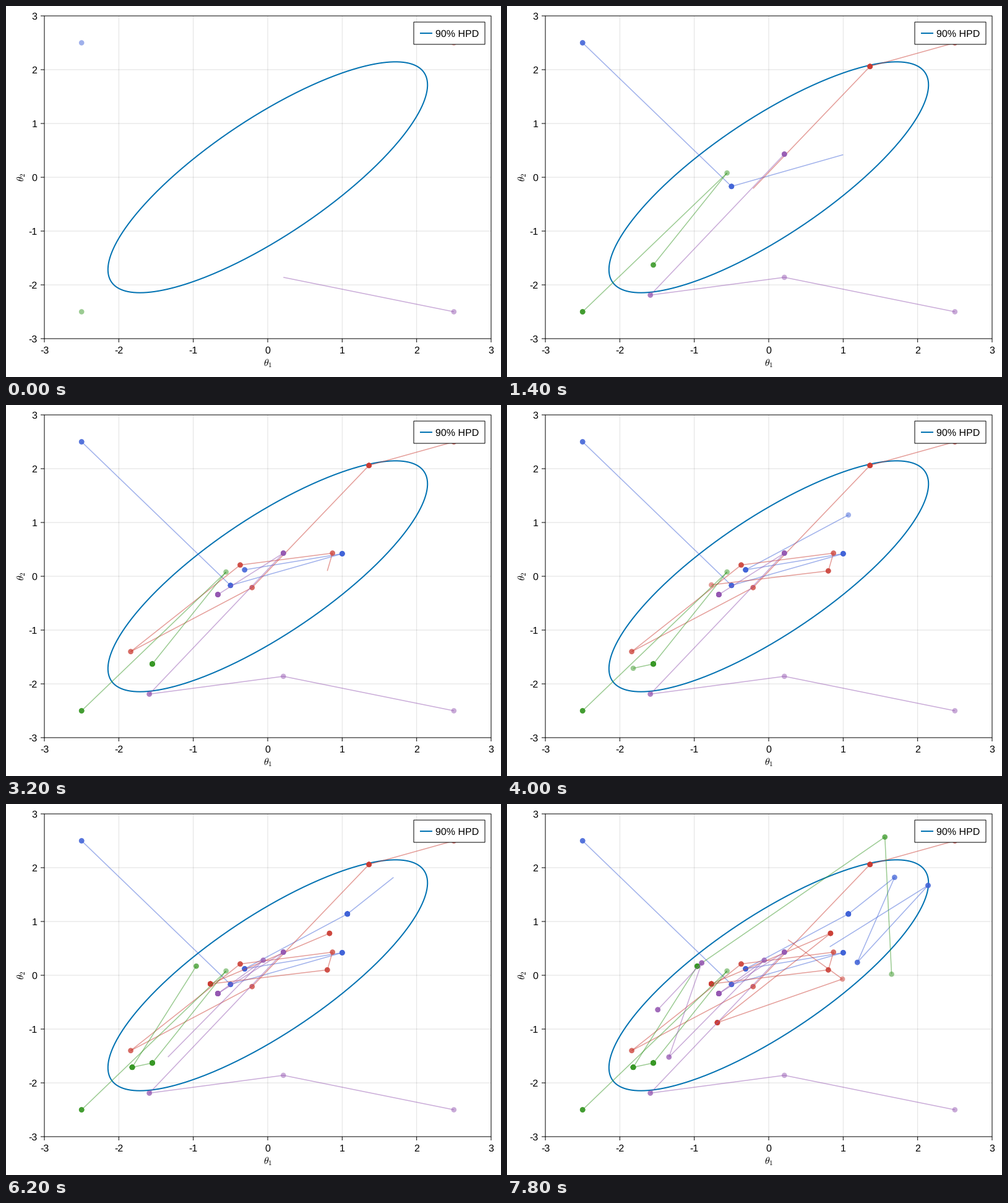
Recreate the animation shown at these times as a matplotlib script. Size 800 by 600 pixels, loop 8 s.

```python
import numpy as np
import matplotlib.pyplot as plt
from matplotlib.animation import FuncAnimation
from matplotlib.patches import Circle, Rectangle

W, H, DPI = 800, 600, 100
PT = 72 / DPI                      # points per pixel
LEFT, RIGHT, TOP, BOTTOM = 62, 784, 16, 538
FRAMES, STEP_MS = 40, 200
CORNER = 2.5

plt.rcParams["font.family"] = "Liberation Sans"
plt.rcParams["mathtext.fontset"] = "cm"
plt.rcParams["text.hinting"] = "no_hinting"

fig = plt.figure(figsize=(W / DPI, H / DPI), dpi=DPI, facecolor="white")
ax = fig.add_axes([0, 0, 1, 1])
ax.set_xlim(0, W)
ax.set_ylim(H, 0)
ax.axis("off")
parts = []                         # (first frame, artist)


def px(x):
    return LEFT + (x + 3) * (RIGHT - LEFT) / 6


def py(y):
    return BOTTOM - (y + 3) * (BOTTOM - TOP) / 6


def line(xs, ys, color="black", width=1.0, z=1, alpha=1.0):
    art, = ax.plot(xs, ys, color=color, lw=width * PT, zorder=z, alpha=alpha,
                   solid_capstyle="butt", snap=False)
    return art


def frame_box(x0, y0, x1, y1, fill, z):
    ax.add_patch(Rectangle((x0, y0), x1 - x0, y1 - y0, facecolor=fill,
                           edgecolor="black", lw=PT, zorder=z, snap=False))


def label(x, y, text, ha="center", va="baseline", **kw):
    ax.text(x, y, text, fontsize=16 * PT, ha=ha, va=va, zorder=20, **kw)


def draw_axes():
    for v in range(-3, 4):
        x, y = px(v), py(v)
        if abs(v) < 3:
            line([x, x], [TOP, BOTTOM], alpha=0.12)
            line([LEFT, RIGHT], [y, y], alpha=0.12)
        line([x, x], [BOTTOM, BOTTOM + 6])
        line([LEFT - 6, LEFT], [y, y])
        label(x, 562.3, str(v))
        label(50.5, y + 5.7, str(v), ha="right")
    frame_box(LEFT, TOP, RIGHT, BOTTOM, "none", 15)
    label(423.5, 577.5, r"$\theta_1$", va="center")
    label(24.5, 277, r"$\theta_2$", va="center", rotation=90)


def draw_region():
    """Smallest region holding 90% of a normal with correlation 0.8."""
    rho, radius = 0.8, np.sqrt(-2 * np.log(0.1))
    t = np.linspace(0, 2 * np.pi, 361)
    x = radius * np.cos(t)
    y = radius * (rho * np.cos(t) + np.sqrt(1 - rho**2) * np.sin(t))
    line(px(x), py(y), "#0072B2", 2, z=2)


def draw_legend():
    frame_box(659, 26, 774, 62, "white", 18)
    line([669, 689], [44, 44], "#0072B2", 2, z=19)
    label(694, 49.8, "90% HPD", ha="left")


def walk(start, *bursts):
    """Position at every step; a burst spreads its jumps evenly in time."""
    path = np.tile(np.array(start, float), (FRAMES + 1, 1))
    for first, last, *stops in bursts:
        steps = np.linspace(first, last, len(stops)).astype(int)
        for step, stop in zip(steps, stops):
            path[step:] = stop
    return path


def add_chain(color, z, corner, *bursts):
    """Every step stacks a half-clear dot; links run one step ahead."""
    path = walk((CORNER * corner[0], CORNER * corner[1]), *bursts)
    xs, ys = px(path[:, 0]), py(path[:, 1])
    for k in range(FRAMES):
        if (path[k] != path[k + 1]).any():
            link = line(xs[k:k + 2], ys[k:k + 2], color, 1.5, z, 0.5)
            parts.append((k, link))
        dot = Circle((xs[k], ys[k]), 4.3, facecolor=color, edgecolor="none",
                     alpha=0.5, zorder=z + 0.5)
        parts.append((k, ax.add_patch(dot)))


draw_axes()
draw_region()
draw_legend()

# Bursts: first step, last step, then the points jumped to.
add_chain("#4063D8", 3, (-1, 1),
          (3, 20, (-.5, -.17), (1, .42), (-.31, .12), (1.07, 1.14)),
          (32, 40, (1.69, 1.82), (1.19, .24), (2.14, 1.67), (.82, .53)))
add_chain("#CB3C33", 4, (1, 1),
          (2, 2, (1.36, 2.06)),
          (8, 20, (-.21, -.21), (-1.84, -1.4), (-.37, .21), (.87, .43),
           (.8, .1), (-.77, -.16)),
          (28, 33, (.83, .78), (-.69, -.88)),
          (39, 40, (.99, -.07), (.26, .66)))
add_chain("#389826", 5, (-1, -1),
          (4, 5, (-.56, .08), (-1.55, -1.63)),
          (20, 30, (-1.82, -1.71), (-.96, .17)),
          (37, 39, (1.56, 2.57), (1.65, .02)))
add_chain("#9558B2", 6, (1, -1),
          (1, 4, (.21, -1.86), (-1.59, -2.19), (.21, .43)),
          (9, 9, (-.67, -.34)),
          (30, 37, (-.06, .28), (-1.34, -1.52), (-.9, .23), (-1.49, -.64)))


def update(frame):
    for start, art in parts:
        art.set_visible(start <= frame)
    return [art for _, art in parts]


anim = FuncAnimation(fig, update, frames=FRAMES, interval=STEP_MS,
                     init_func=lambda: update(0), repeat=True,
                     repeat_delay=0, blit=False)
plt.show()
```
